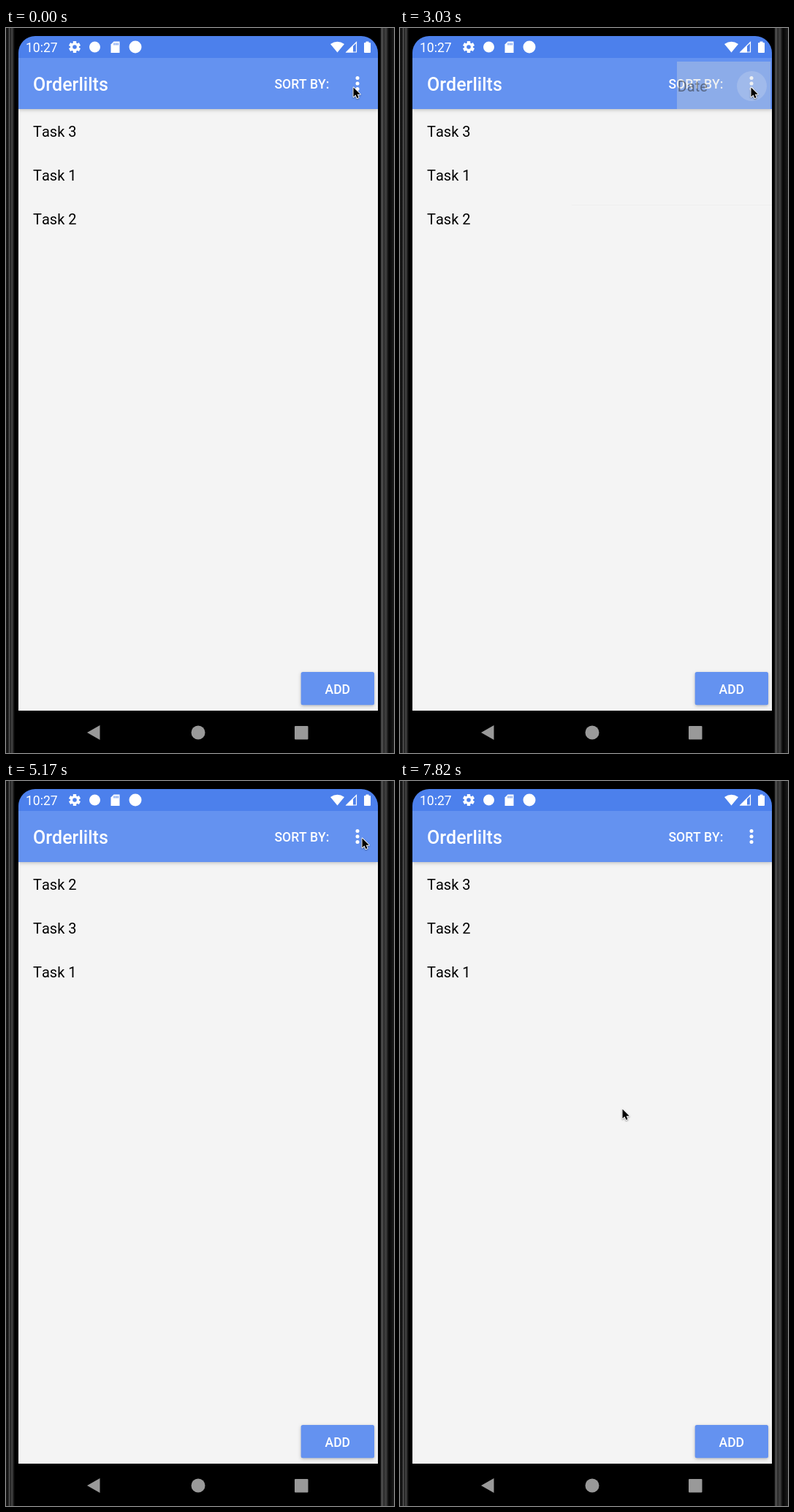
Write an HTML page with a canvas that moves like this. It is 531x993 px and loops after 8000 ms.

```html
<!DOCTYPE html>
<html lang="en">
<head>
<meta charset="utf-8">
<title>Task list sorting</title>
<style>
html, body { margin: 0; width: 100%; height: 100%; overflow: hidden; background: #000; }
canvas { display: block; }
</style>
</head>
<body>
<canvas id="stage" width="531" height="993"></canvas>
<script>
const ctx = document.getElementById('stage').getContext('2d');
const LOOP = 8000;
const BLUE = '#6492f0';
const PAGE = '#f4f4f4';
const MENU_ITEMS = ['Priority Number', 'Due Date', 'Smart Sort'];

// Each track holds its value until the next time.
const cursorTrack = [
  [0, 475, 81], [530, 470, 82], [710, 432, 84], [890, 385, 83], [1070, 367, 81],
  [1960, 388, 88], [2140, 446, 91], [2310, 484, 82], [2670, 480, 81],
  [3380, 452, 100], [3560, 352, 133], [3740, 326, 137],
  [4630, 340, 130], [4810, 405, 104], [4990, 474, 80], [5170, 487, 78],
  [5880, 380, 168], [6050, 326, 196],
  [7110, 325, 196], [7290, 324, 196], [7640, 336, 232], [7820, 304, 449]
];
const menuTrack = [
  [0, 'closed'], [180, 'opening'], [360, 'open'], [1430, 'fading', 0], [1610, 'closed'],
  [3030, 'opening'], [3200, 'open'], [4100, 'fading', 1], [4280, 'closed'],
  [5520, 'opening'], [5700, 'open'], [6400, 'open', 2], [6580, 'fading', 2], [6750, 'closed']
];
const orderTrack = [[0, 3, 1, 2], [4100, 2, 3, 1], [6580, 3, 2, 1]];

function valueAt(track, t) {
  let current = track[0];
  for (const key of track) if (key[0] <= t) current = key;
  return current.slice(1);
}

function rect(x, y, w, h, color) {
  ctx.fillStyle = color;
  ctx.fillRect(x, y, w, h);
}

function rounded(x, y, w, h, r, color) {
  ctx.fillStyle = color;
  ctx.beginPath();
  ctx.roundRect(x, y, w, h, r);
  ctx.fill();
}

function disc(x, y, r, color) {
  ctx.fillStyle = color;
  ctx.beginPath();
  ctx.arc(x, y, r, 0, Math.PI * 2);
  ctx.fill();
}

function polygon(points, color) {
  ctx.fillStyle = color;
  ctx.beginPath();
  points.forEach(([x, y]) => ctx.lineTo(x, y));
  ctx.closePath();
  ctx.fill();
}

function text(str, x, y, size, color, weight = 400) {
  ctx.font = `${weight} ${size}px Roboto, sans-serif`;
  ctx.fontKerning = 'none';
  ctx.fillStyle = color;
  ctx.fillText(str, x, y);
}

function withShadow(blur, offset, alpha, draw) {
  ctx.save();
  ctx.shadowColor = `rgba(0,0,0,${alpha})`;
  ctx.shadowBlur = blur;
  ctx.shadowOffsetY = offset;
  draw();
  ctx.restore();
}

function edge(x, width, stops) {
  const g = ctx.createLinearGradient(x, 0, x + width, 0);
  stops.forEach(([dx, color]) => g.addColorStop(dx / width, color));
  rect(x, 0, width, 993, g);
}

function drawPhone() {
  rect(0, 0, 531, 993, '#000');
  edge(0, 13, [[0, '#1a1a1a'], [3, '#111'], [4.5, '#555'], [6, '#1a1a1a'],
    [8, '#4a4a4a'], [10, '#222'], [12, '#000']]);
  edge(512, 19, [[0, '#000'], [2.5, '#555'], [5, '#2a2a2a'], [8, '#444'],
    [10, '#222'], [12, '#050505'], [19, '#1c1c1c']]);
}

function drawGear(x, y) {
  ctx.save();
  ctx.translate(x, y);
  for (let i = 0; i < 6; i++) {
    rect(-2.2, -8, 4.4, 5, '#fff');
    ctx.rotate(Math.PI / 3);
  }
  ctx.restore();
  disc(x, y, 6, '#fff');
  disc(x, y, 2.8, '#4c80ec');
}

function drawStatusBar() {
  rect(17, 11, 492, 30, '#4c80ec');
  text('10:27', 27, 33, 17.5, '#fff');
  drawGear(94, 26);
  disc(121.5, 26, 7.5, '#fff');
  polygon([[147.5, 18.5], [155.5, 18.5], [155.5, 34], [143.5, 34], [143.5, 22.5]], '#fff');
  for (let i = 0; i < 3; i++) rect(147.5 + i * 2.5, 20.5, 1.2, 3, '#4c80ec');
  disc(177, 26, 8.5, '#fff');

  ctx.fillStyle = '#fff';
  ctx.beginPath();
  ctx.moveTo(453.5, 33.5);
  ctx.lineTo(444, 22);
  ctx.quadraticCurveTo(453.5, 15.5, 463, 22);
  ctx.fill();
  polygon([[465, 33.5], [475, 23.5], [475, 33.5]], '#fff');
  ctx.strokeStyle = '#fff';
  ctx.lineWidth = 1.2;
  ctx.beginPath();
  ctx.moveTo(466, 33);
  ctx.lineTo(479.5, 19.5);
  ctx.lineTo(479.5, 33);
  ctx.closePath();
  ctx.stroke();
  rounded(490, 20, 9, 14, 1, '#fff');
  rect(492.5, 18.5, 4, 2, '#fff');
}

function drawAppBar(ripple) {
  withShadow(5, 1, 0.25, () => rect(17, 41, 492, 70, BLUE));
  drawStatusBar();
  text('Orderlilts', 37, 86, 25, '#fff', 500);
  text('SORT BY:', 367.5, 83, 17.5, '#fff', 500);
  if (ripple) disc(481.5, 79.5, 20.5, 'rgba(255,255,255,.2)');
  for (const dy of [-7.5, 0, 7.5]) disc(481, 76 + dy, 2.5, '#fff');
}

function drawPage(order) {
  rect(17, 41, 492, 894, PAGE);
  order.forEach((n, i) => text('Task ' + n, 37, 149 + i * 60, 20, '#000'));
  withShadow(4, 1.5, 0.25, () => rounded(403.7, 882, 100.3, 45.2, 2.5, BLUE));
  text('ADD', 436.5, 911.5, 17.5, '#fff', 500);
}

function drawNavigation() {
  rect(17, 935, 492, 58, '#000');
  const gray = '#999';
  polygon([[111, 965], [128.5, 955], [128.5, 975]], gray);
  disc(263, 965, 9.5, gray);
  rounded(395, 956, 18.5, 18.5, 1, gray);
}

function drawOpeningMenu() {
  rect(235, 242, 274, 1, 'rgba(0,0,0,.025)');
  ctx.save();
  ctx.beginPath();
  ctx.rect(379, 46, 128, 65);
  ctx.clip();
  rect(379, 46, 128, 65, 'rgba(210,215,220,.36)');
  text(MENU_ITEMS[1], 340, 87, 20, 'rgba(33,33,33,.5)');
  ctx.restore();
}

function drawHalo(x, bottom, alpha) {
  rounded(x, 111, 509 - x, bottom - 111, [0, 0, 10, 14], `rgba(0,0,0,${alpha})`);
}

function drawMenuItems(pressed) {
  if (pressed !== undefined) rect(258.5, 46 + pressed * 60, 245.5, 60.5, 'rgba(0,0,0,.12)');
  MENU_ITEMS.forEach((item, i) => text(item, 278.5, 84 + i * 60, 20, '#212121'));
}

function drawOpenMenu(pressed) {
  rect(235, 115, 274, 128, 'rgba(0,0,0,.006)');
  drawHalo(250, 243, 0.03);
  withShadow(5, 1, 0.4, () => rounded(258.5, 46, 245.5, 180.5, 2, '#fafafa'));
  drawMenuItems(pressed);
}

function drawFadingMenu(pressed) {
  drawHalo(253, 238, 0.035);
  rounded(265, 111, 239, 117, 5, 'rgba(0,0,0,.04)');
  ctx.save();
  ctx.globalAlpha = 0.56;
  rounded(258.5, 46, 245.5, 181, 2, '#fafafa');
  ctx.globalAlpha = 0.64;
  drawMenuItems(pressed);
  ctx.restore();
}

function drawCursor(x, y) {
  ctx.save();
  ctx.translate(x + 0.5, y + 0.5);
  ctx.scale(0.9, 0.9);
  const shape = new Path2D('M0 0V14.2L3.3 11.2L5.5 16.2L7.9 15.2L5.8 10.3H10.3Z');
  ctx.lineJoin = 'round';
  ctx.lineWidth = 2;
  ctx.strokeStyle = '#fff';
  withShadow(2, 1, 0.4, () => ctx.stroke(shape));
  ctx.fillStyle = '#000';
  ctx.fill(shape);
  ctx.restore();
}

function draw(t) {
  const [state, pressed] = valueAt(menuTrack, t);
  drawPhone();
  ctx.save();
  ctx.beginPath();
  ctx.roundRect(17, 11, 492, 982, 23);
  ctx.clip();
  drawPage(valueAt(orderTrack, t));
  drawAppBar(state === 'opening');
  if (state === 'opening') drawOpeningMenu();
  if (state === 'open') drawOpenMenu(pressed);
  if (state === 'fading') drawFadingMenu(pressed);
  drawNavigation();
  ctx.restore();
  drawCursor(...valueAt(cursorTrack, t));
}

const start = performance.now();
function tick() {
  draw((performance.now() - start) % LOOP);
  requestAnimationFrame(tick);
}
tick();
</script>
</body>
</html>
```
